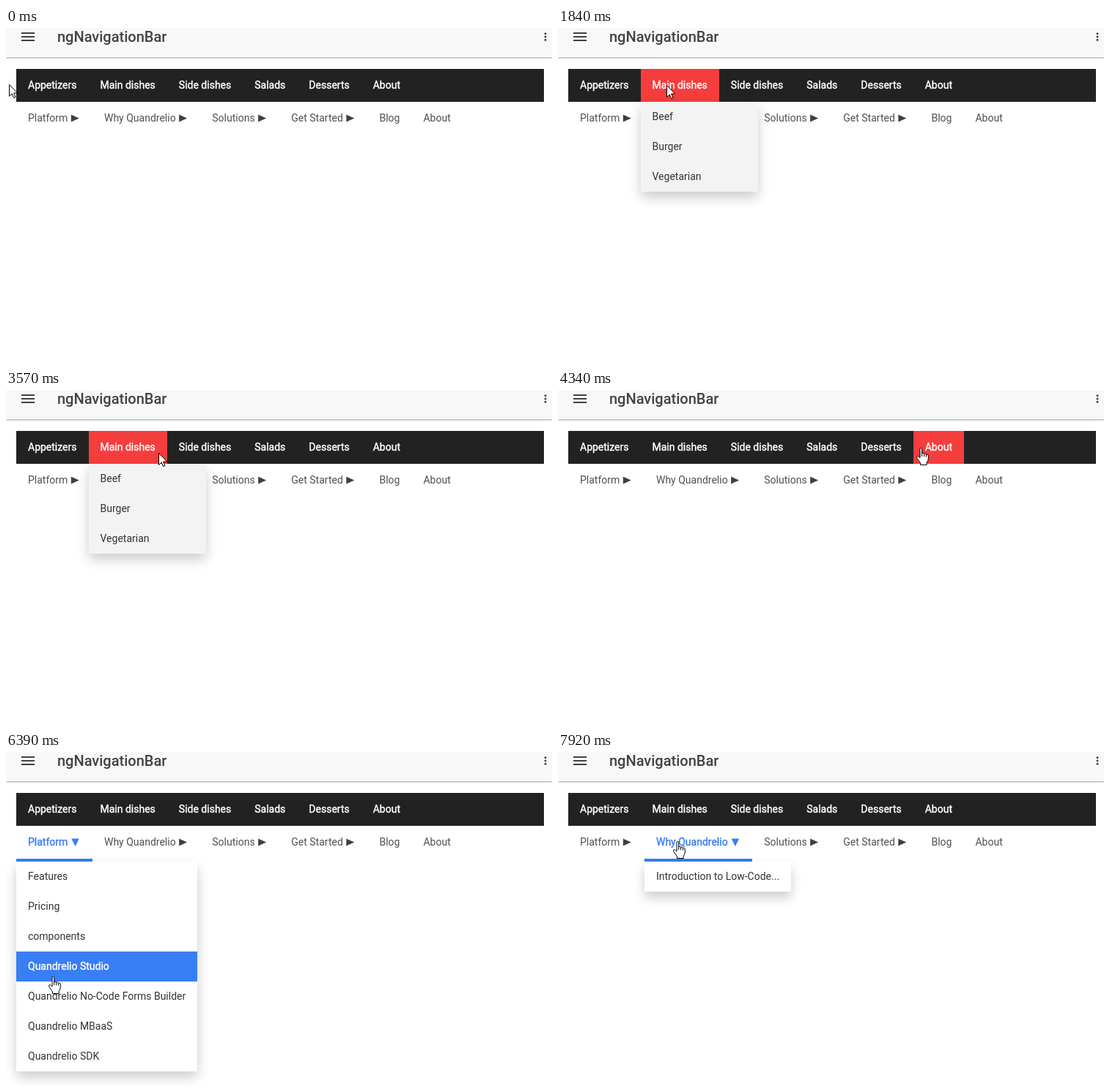
An HTML page that plays this animation: 745 px wide and 457 px high, repeating every 7.99 s.

```html
<!DOCTYPE html>
<html lang="en">
<head>
<meta charset="utf-8">
<title>Navigation bar</title>
<style>
  html, body { margin: 0; width: 100%; height: 100%; overflow: hidden; background: #fff; }
  body { position: relative; font: 14px Roboto, sans-serif; cursor: default; }
  header {
    position: absolute; top: 0; left: 0; width: 100%; height: 40px;
    background: #f8f8f8; box-shadow: 0 1px 2px rgba(0, 0, 0, .4);
  }
  header svg { position: absolute; left: 0; top: 0; }
  h1 { position: absolute; left: 70px; top: 0; margin: 0; font-size: 20px; font-weight: 500; line-height: 24px; color: #424242; }
  nav { position: absolute; left: 14px; width: 720px; display: flex; white-space: nowrap; }
  .item { position: relative; box-sizing: border-box; padding: 0 16px; line-height: 45px; }
  .menu {
    display: none; position: absolute; z-index: 1; left: 0; top: 100%; min-width: 160px;
    line-height: 41px; color: #333; box-shadow: 0 8px 16px rgba(0, 0, 0, .2);
  }
  .menu div { padding: 0 16px; }
  .open .menu { display: block; }

  #food { top: 56px; height: 45px; background: #222; color: #fff; }
  #food .item, #site .open, #site .row.on { -webkit-text-stroke: .4px; }
  #food .menu, #site .menu { -webkit-text-stroke: 0; }
  #food .open { background: #f53d3d; }
  #food .menu { background: #f3f3f3; }
  #food .row.on { background: #ddd; }

  #site { top: 101px; height: 49px; color: #505050; }
  #site .item { border-bottom: 4px solid transparent; height: 49px; }
  #site .open { color: #387ef5; border-color: #387ef5; }
  #site .menu { background: #fff; top: 49px; }
  #site .row.on { background: #387ef5; color: #fff; }
  .tri {
    display: inline-block; width: 14.2px; height: 11px; vertical-align: -1px; background: #404040;
    clip-path: polygon(1px .5px, 12px 5.5px, 1px 10.5px);
  }
  .open .tri { background: #387ef5; clip-path: polygon(1.5px .5px, 12px .5px, 6.75px 11px); }

  .overlay { position: absolute; left: 0; top: 0; z-index: 2; pointer-events: none; }
</style>
</head>
<body>
<header>
  <svg width="745" height="40" fill="#424242">
    <path d="M21 6h18v2H21zM21 11h18v2H21zM21 16h18v2H21z"/>
    <circle cx="736" cy="7.7" r="1.5"/><circle cx="736" cy="12" r="1.5"/><circle cx="736" cy="16.3" r="1.5"/>
  </svg>
  <h1>ngNavigationBar</h1>
</header>
<nav id="food"></nav>
<nav id="site"></nav>
<svg class="overlay" width="745" height="457">
  <defs>
    <path id="arrowShape" d="M.5.5V16.5L4.2 13 6.6 18.6 9 17.6 6.6 12H11.6Z"/>
    <clipPath id="barClip"><path d="M0 56h745v45H0z"/></clipPath>
  </defs>
  <g id="trail" clip-path="url(#barClip)"><use href="#arrowShape" x="155" y="85" fill="#8c4249"/></g>
  <g id="pointer" fill="#fff" stroke="#000" stroke-linejoin="round">
    <use id="arrow" href="#arrowShape"/>
    <g id="hand" transform="translate(-6 0)">
      <path d="M5 1.8Q5 .5 6.3.5T7.7 1.8V8Q7.8 7 9 7 10.5 7 10.6 8.6 11 7.8 12 7.9 13.3 8 13.4 9.6 13.8 9 14.7 9.2 16.3 9.5 16.3 11V15Q16.3 18 14.2 20.3V23.5H5.5V20.8Q3.5 18.5 1 14.5 0 12.6 1 11.8 2.2 11 3.6 12.6L5 14Z"/>
      <path d="M7.7 8v4M10.6 8.6v3.6M13.4 9.6v3" fill="none"/>
    </g>
  </g>
</svg>
<script>
const DURATION = 7990, STEP = 70, ROW_HEIGHT = 41;

const food = [
  ['Appetizers', 'Soup'],
  ['Main dishes', 'Beef', 'Burger', 'Vegetarian'],
  ['Side dishes', 'Fries'],
  ['Salads', 'Greek'],
  ['Desserts', 'Ice cream'],
  ['About'],
];
const site = [
  ['Platform ▸', 'Features', 'Pricing', 'components', 'Quandrelio Studio',
    'Quandrelio No-Code Forms Builder', 'Quandrelio MBaaS', 'Quandrelio SDK'],
  ['Why Quandrelio ▸', 'Introduction to Low-Code...'],
  ['Solutions ▸'], ['Get Started ▸'], ['Blog'], ['About'],
];

const NONE = -1, APPETIZERS = 0, MAIN = 1, SIDE = 2, SALADS = 3, DESSERTS = 4, ABOUT = 5, PLATFORM = 6, WHY = 7;

// time, pointer x, pointer y, open item
const path = [
  [0, 4, 77, NONE], [459, 4, 77, NONE],
  [460, 16, 77, APPETIZERS], [670, 40, 77, APPETIZERS], [869, 40, 77, APPETIZERS],
  [870, 43, 81, APPETIZERS], [1220, 70, 121, APPETIZERS], [1630, 108, 88, APPETIZERS],
  [1700, 122, 81, MAIN], [1840, 148, 78, MAIN], [2460, 155, 85, MAIN],
  [2530, 156, 96, MAIN], [2870, 159, 173, MAIN], [3290, 160, 198, MAIN],
  [3360, 168, 180, MAIN], [3570, 208, 86, MAIN],
  [3640, 240, 82, SIDE], [3850, 345, 80, SALADS], [4060, 425, 78, DESSERTS], [4130, 455, 78, DESSERTS],
  [4200, 488, 79, ABOUT], [4340, 495, 79, ABOUT], [4690, 500, 82, ABOUT], [4749, 500, 82, ABOUT],
  [4750, 8, 117, NONE], [5209, 8, 117, NONE],
  [5210, 18, 118, PLATFORM], [5420, 45, 121, PLATFORM], [5619, 45, 121, PLATFORM],
  [5620, 48, 132, PLATFORM], [5830, 58, 166, PLATFORM], [6390, 64, 307, PLATFORM],
  [6460, 65, 325, PLATFORM], [6740, 70, 394, PLATFORM], [7080, 68, 332, PLATFORM], [7220, 75, 262, PLATFORM],
  [7290, 85, 231, PLATFORM], [7570, 108, 146, PLATFORM],
  [7640, 125, 134, WHY], [7920, 163, 122, WHY], [DURATION, 163, 122, WHY],
];

const byId = id => document.getElementById(id);

function add(parent, className, text = '') {
  const el = document.createElement('div');
  el.className = className;
  el.textContent = text;
  return parent.appendChild(el);
}

function buildNav(nav, entries) {
  return entries.map(([label, ...rows]) => {
    const item = add(nav, 'item', label.replace('▸', ''));
    if (label.endsWith('▸')) item.appendChild(document.createElement('span')).className = 'tri';
    const menu = rows.length ? add(item, 'menu') : null;
    return { item, rows: rows.map(text => add(menu, 'row', text)) };
  });
}

const items = [...buildNav(byId('food'), food), ...buildNav(byId('site'), site)];

function pointerAt(time) {
  const i = path.findLastIndex(key => key[0] <= time);
  const [t0, x0, y0, open] = path[i];
  const [t1, x1, y1] = path[i + 1] || path[i];
  const part = t1 > t0 ? Math.floor((time - t0) / STEP) * STEP / (t1 - t0) : 0;
  return { x: Math.round(x0 + (x1 - x0) * part), y: Math.round(y0 + (y1 - y0) * part), open };
}

function draw(time) {
  const { x, y, open } = pointerAt(time);
  const menuTop = open < PLATFORM ? 101 : 150;
  const activeRow = Math.floor((y - menuTop) / ROW_HEIGHT);
  items.forEach(({ item, rows }, i) => {
    item.classList.toggle('open', i === open);
    rows.forEach((row, r) => row.classList.toggle('on', i === open && r === activeRow));
  });
  const onButton = open < ABOUT && y < menuTop;
  const isHand = open !== NONE && !onButton;
  byId('hand').style.display = isHand ? '' : 'none';
  byId('arrow').style.display = isHand ? 'none' : '';
  byId('pointer').setAttribute('transform', `translate(${x} ${y})`);
  byId('trail').style.display = time >= 2530 && time < 3360 ? '' : 'none';
}

const start = performance.now();
function frame() {
  draw((performance.now() - start) % DURATION);
  requestAnimationFrame(frame);
}
frame();
</script>
</body>
</html>
```
